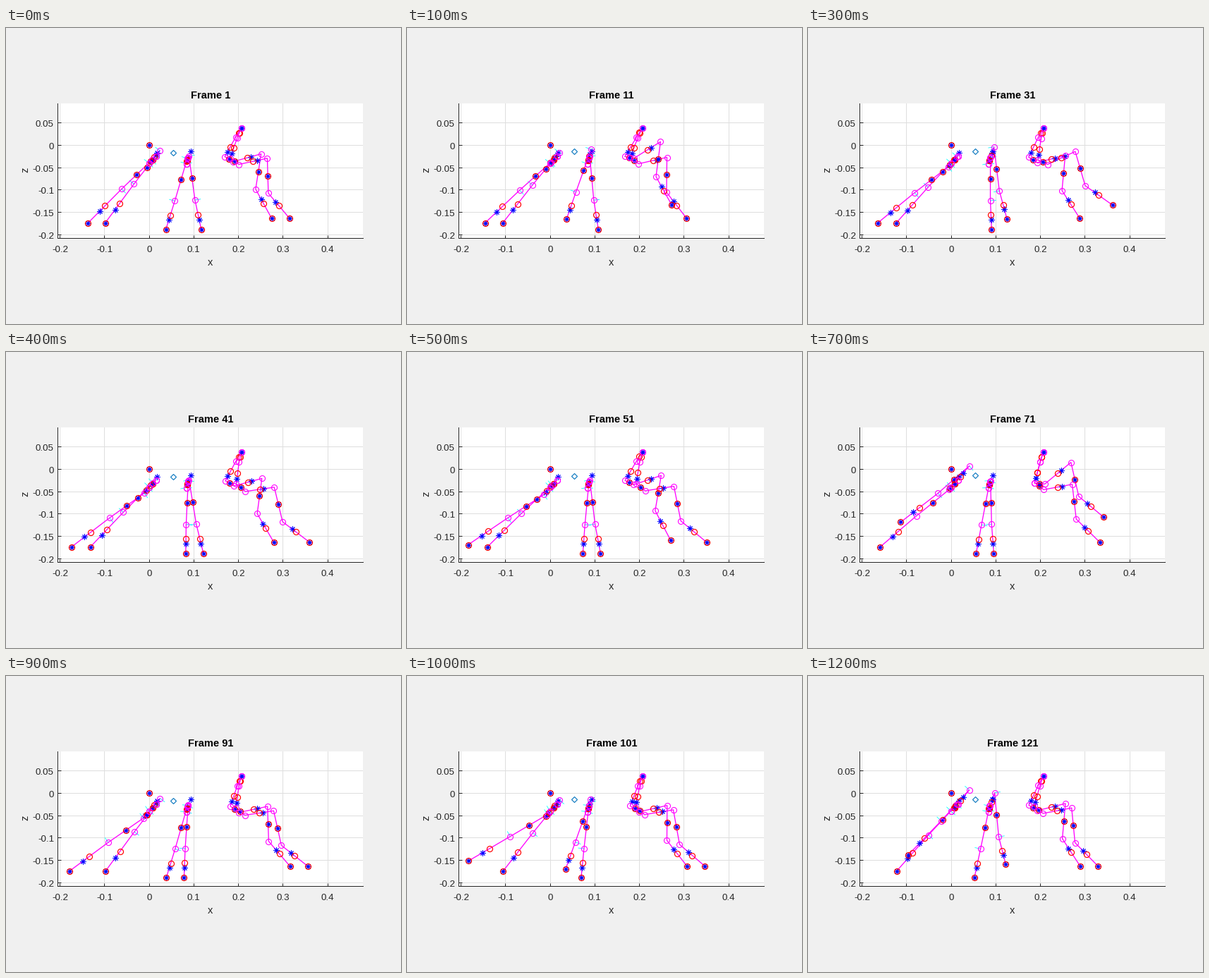
Animation of 560x420 px, one loop 1300 ms. Source, as a matplotlib script:

```python
import numpy as np
import matplotlib.pyplot as plt
from matplotlib.animation import FuncAnimation

W, H, DPI = 560, 420, 72
FRAMES, STEP_MS = 13, 100
X0, Z0, UNIT = 203, 166.5, 633.0
LEFT, RIGHT, TOP, BOTTOM = 73, 506, 106.5, 298
INK = "#262626"

# Gait, in frames: legs step in three groups, a third of the period apart
PERIOD, STANCE, FIRST_STEP = 13.7, 9.9, 3.9

plt.rcParams["font.family"] = "Liberation Sans"


class Leg:
    """A limb swept between two reaches on the ground and lifted on return.

    Points run from foot to body, in stage pixels; `root` joints stay fixed.
    """

    def __init__(self, fore, aft, lift, root, mass, ease=1.0):
        self.fore, self.aft, self.lift = (np.array(p, float) for p in (fore, aft, lift))
        self.root, self.mass, self.ease = root, np.array(mass), ease

    def pose(self, n, group):
        """Joints from body to foot."""
        t = (n - FIRST_STEP - group * PERIOD / 3) % PERIOD
        if t < STANCE:
            sweep, height = (t / STANCE) ** self.ease, 0
        else:
            p = (t - STANCE) / (PERIOD - STANCE)
            sweep = 1 - p + np.sin(2 * np.pi * p) / 4
            height = np.sin(np.pi * p) ** 2
        joints = self.fore + sweep * (self.aft - self.fore) + height * self.lift
        return np.vstack([self.root, joints[::-1]])


HIND = Leg(fore=[(144, 277), (184, 221), (220, 173)],
           aft=[(89.5, 277), (144.5, 237), (194.5, 203)],
           lift=[(0, -40), (11, -27), (17, -20)],
           root=[(213, 182), (203, 192)], mass=[0.5, 0.66, 0.5, 0.66], ease=1.1)
MID = Leg(fore=[(281, 286.5), (270.5, 244.5), (260, 182)],
          aft=[(226.5, 286.5), (239.5, 246), (257.5, 185.5)],
          lift=[(2, -33), (2, -28), (9, -28)],
          root=[(258, 184), (256, 193)], mass=[0.5, 0.66, 0.5, 0.66])
FRONT = Leg(fore=[(431.5, 270.5), (393, 241.5), (381, 192.5),
                  (340, 198.5), (327, 187.5), (331, 157)],
            aft=[(376.5, 270.5), (354, 229), (362, 179),
                 (322.5, 190), (310.5, 183), (326, 155.5)],
            lift=[(0, -41), (0, -38), (-4, -37), (0, -10), (-2, 0), (0, 0)],
            root=[(334, 142.5)], mass=[0, 0.77, 0.5, 0.63, 0.5, 0.35])

# Leg, step group, side its joint axes point to (0: not drawn)
LEGS = [(HIND, 1, 1), (HIND, 2, -1), (MID, 0, -1),
        (MID, 2, 1), (FRONT, 0, 0), (FRONT, 1, 0)]
BODY_MASSES = [(X0, Z0), (214, 177), (262, 175.5)]


def along(joints, frac):
    frac = np.reshape(frac, (-1, 1))
    return joints[:-1] + frac * np.diff(joints, axis=0)


fig = plt.figure(figsize=(W / DPI, H / DPI), dpi=DPI, facecolor="#f0f0f0")
ax = fig.add_axes([LEFT / W, 1 - BOTTOM / H, (RIGHT - LEFT) / W, (BOTTOM - TOP) / H])
ax.set(xlim=(LEFT + 0.5, RIGHT + 0.5), ylim=(BOTTOM + 0.5, TOP + 0.5))
ax.set_axisbelow(True)
ax.spines[["top", "right"]].set_visible(False)
for side in ("left", "bottom"):
    ax.spines[side].set(color=INK, linewidth=1)


def label(x, y, text, size=13.33, color=INK, **kw):
    return fig.text(x / W, 1 - y / H, text, fontsize=size, color=color, **kw)


xs, zs = np.arange(-2, 5) / 10, np.arange(-4, 2) / 20
ax.set_xticks(X0 + UNIT * xs, [""] * len(xs))
ax.set_yticks(Z0 - UNIT * zs, [""] * len(zs))
ax.tick_params(direction="in", length=4.5, width=1, color=INK)
ax.grid(color="#dedede", linewidth=1)
for v in xs:
    label(X0 + UNIT * v, 318, f"{v:g}", ha="center")
for v in zs:
    label(68, Z0 - UNIT * v + 5.5, f"{v:g}", ha="right")
label(290, 337, "x", 14.67, ha="center")
label(27, 201.5, "z", 14.67, ha="center", va="center", rotation=90)
title = label(290, 100, "", 14.67, "black", ha="center", weight="bold")


def marks(marker, color, z, size=8, width=1.1):
    return ax.plot([], [], ls="", marker=marker, ms=size, mec=color, mfc="none",
                   mew=width, zorder=z)[0]


chains = [ax.plot([], [], color="magenta", lw=1.3, zorder=3)[0] for _ in LEGS]
stars = marks((8, 2, 0), "blue", 4, width=1)
mids = marks("o", "red", 5, width=1.2)
joint_dots = marks("o", "magenta", 6)
balance = marks("D", "#0072bd", 4, size=6.2)
axles = ax.plot([], [], color="cyan", lw=0.8, zorder=2.5)[0]


def draw(n):
    reds, magentas, blues, strokes = [(X0, Z0)], [], list(BODY_MASSES), []
    for line, (leg, group, side) in zip(chains, LEGS):
        j = leg.pose(n, group)
        line.set_data(*j.T)
        magentas.extend(j[:-1])
        reds.extend([*along(j, np.full(len(j) - 1, 0.5)), j[-1]])
        blues.extend([*along(j, leg.mass), j[-1]])
        if side:
            dx, dy = j[-3] - j[-1]
            normal = side * np.array([-dy, dx]) / np.hypot(dx, dy)
            for joint in j[1:-1]:
                strokes.extend([joint, joint + 8 * normal, (np.nan, np.nan)])
    for artist, pts in ((mids, reds), (joint_dots, magentas),
                        (stars, blues), (axles, strokes)):
        artist.set_data(*np.transpose(pts))
    sway = 176 + 1.3 * np.cos(6 * np.pi * (n - 4.2) / PERIOD)
    balance.set_data([237], [sway])
    title.set_text(f"Frame {10 * n + 1}")
    return [*chains, mids, joint_dots, stars, axles, balance, title]


anim = FuncAnimation(fig, draw, frames=FRAMES, interval=STEP_MS, repeat=True)
plt.show()
```
